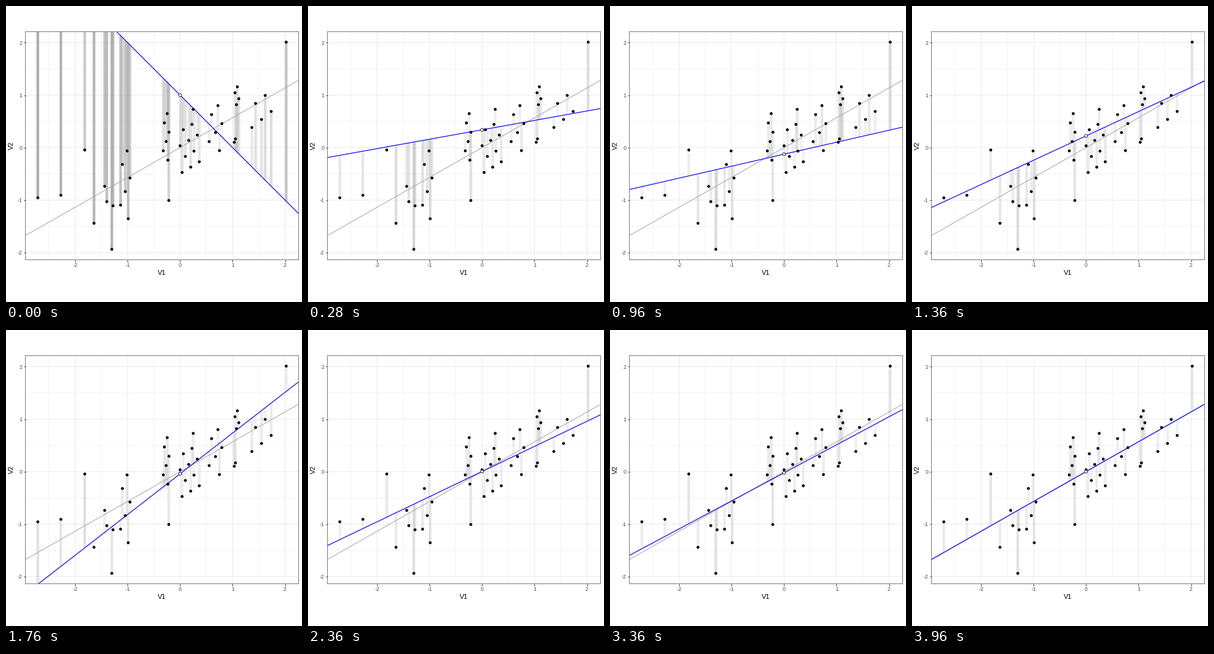
A matplotlib script for the animation above (4 s loop, 480x480 px).

```python
import math

import matplotlib.pyplot as plt
import numpy as np
from matplotlib.animation import FuncAnimation
from matplotlib.collections import LineCollection
from matplotlib.patches import Circle

plt.rcParams["font.family"] = "Liberation Sans"
plt.rcParams["path.snap"] = False

SIZE, DPI = 480, 72
FRAMES, INTERVAL = 100, 40
UNIT = 85.1                          # pixels per data unit
X0, Y0 = 282.3, 229.6                # stage position of the data origin
LEFT, TOP, RIGHT, BOTTOM = 31.5, 41.6, 474.5, 411.5
SLOPE = 0.5685                       # least squares fit, through the origin
STIFF, DRAG = 0.0366, 0.086          # spring constant and friction per frame
GOLDEN = (math.sqrt(5) - 1) / 2

# Single observations that stand apart, in stage pixels
LONE = [(51.6, 311), (89, 307), (127.7, 233.5), (142.7, 352.4),
        (160, 292.5), (163.5, 317.3), (171.6, 394.6), (173.6, 324),
        (264, 315.4), (303.6, 167.6), (454.4, 58.6)]
# Clouds of observations: x range, y range, count
CLOUDS = [(184, 204, 235, 345, 6), (254, 266, 174.5, 250, 6),
          (279, 315.5, 192, 270, 10), (327, 354, 161.5, 234.5, 6),
          (369, 379, 131, 160, 4), (369, 374, 215.5, 221, 2),
          (395, 436, 145, 197, 5)]


def cloud(x_min, x_max, y_min, y_max, count):
    """Even steps down, golden-ratio steps across."""
    across = np.arange(1, count + 1) * GOLDEN % 1
    return np.column_stack([x_min + (x_max - x_min) * across,
                            np.linspace(y_min, y_max, count)])


def swing():
    """Intercept and slope of a rod pulled to rest by vertical springs."""
    state = np.array([1.0, -math.pi / 4])         # shift and angle
    speed = np.zeros(2)
    path = []
    for frame in range(FRAMES - 1):
        shift, slope = state[0], math.tan(state[1])
        path.append((shift, slope))
        pull = STIFF * np.array([-shift, SLOPE - slope])
        speed = speed * (1 - DRAG) + pull * (0.5 if frame == 0 else 1)
        state = state + speed
    path.append((0.0, SLOPE))                     # settles on the fit
    return path


points = np.vstack([LONE] + [cloud(*c) for c in CLOUDS])
x = (points[:, 0] - X0) / UNIT
y = (Y0 - points[:, 1]) / UNIT
PATH = swing()

fig = plt.figure(figsize=(SIZE / DPI, SIZE / DPI), dpi=DPI, facecolor="white")
ax = fig.add_axes([LEFT / SIZE, 1 - BOTTOM / SIZE,
                   (RIGHT - LEFT) / SIZE, (BOTTOM - TOP) / SIZE])
xlim = np.array([LEFT - X0, RIGHT - X0]) / UNIT
ylim = np.array([Y0 - BOTTOM, Y0 - TOP]) / UNIT
ax.set(xlim=xlim, ylim=ylim)

for v in np.arange(-2.5, 2.6, 0.5):
    width = 1.07 if v == int(v) else 0.53
    if xlim[0] < v < xlim[1]:
        ax.axvline(v, color="#ebebeb", lw=width, zorder=0)
    if ylim[0] < v < ylim[1]:
        ax.axhline(v, color="#ebebeb", lw=width, zorder=0)

ticks = range(-2, 3)
labels = [str(t) for t in ticks]
ax.set_xticks(ticks, labels)
ax.set_yticks(ticks, labels)
ax.tick_params(length=2.75, width=1.07, pad=2.2, color="#333333",
               labelcolor="#4d4d4d", labelsize=8.8)
for spine in ax.spines.values():
    spine.set(color="#7f7f7f", linewidth=1.07, zorder=8)
fig.text(253 / SIZE, 1 - 436.3 / SIZE, "V1", size=11, ha="center")
fig.text(14 / SIZE, 1 - 226.5 / SIZE, "V2", size=11, rotation=90,
         ha="right", va="center")

springs = LineCollection([], linewidths=4.27, capstyle="butt", zorder=2)
ax.add_collection(springs, autolim=False)
ax.plot(xlim, SLOPE * xlim, color="#a9a9a9", lw=1.07, zorder=3)
rod, = ax.plot([], [], color="blue", lw=1.2, zorder=4)
for spot in zip(x, y):
    ax.add_patch(Circle(spot, 2.35 / UNIT, fc="black", lw=0, zorder=5))
pivot = ax.add_patch(Circle((0, 1), 2.4 / UNIT, fc="white", ec="black",
                            lw=0.8, zorder=6))


def draw(frame):
    shift, slope = PATH[frame]
    fit = shift + slope * x
    tension = np.minimum(0.12 + 0.18 * np.abs(y - fit), 1)
    springs.set_segments([[(a, b), (a, c)] for a, b, c in zip(x, y, fit)])
    springs.set_color([(0.663, 0.663, 0.663, t) for t in tension])
    rod.set_data(xlim, shift + slope * xlim)
    pivot.set_center((0, shift))
    return springs, rod, pivot


anim = FuncAnimation(fig, draw, frames=FRAMES, interval=INTERVAL,
                     repeat=True, repeat_delay=0, blit=False)
plt.show()
```
